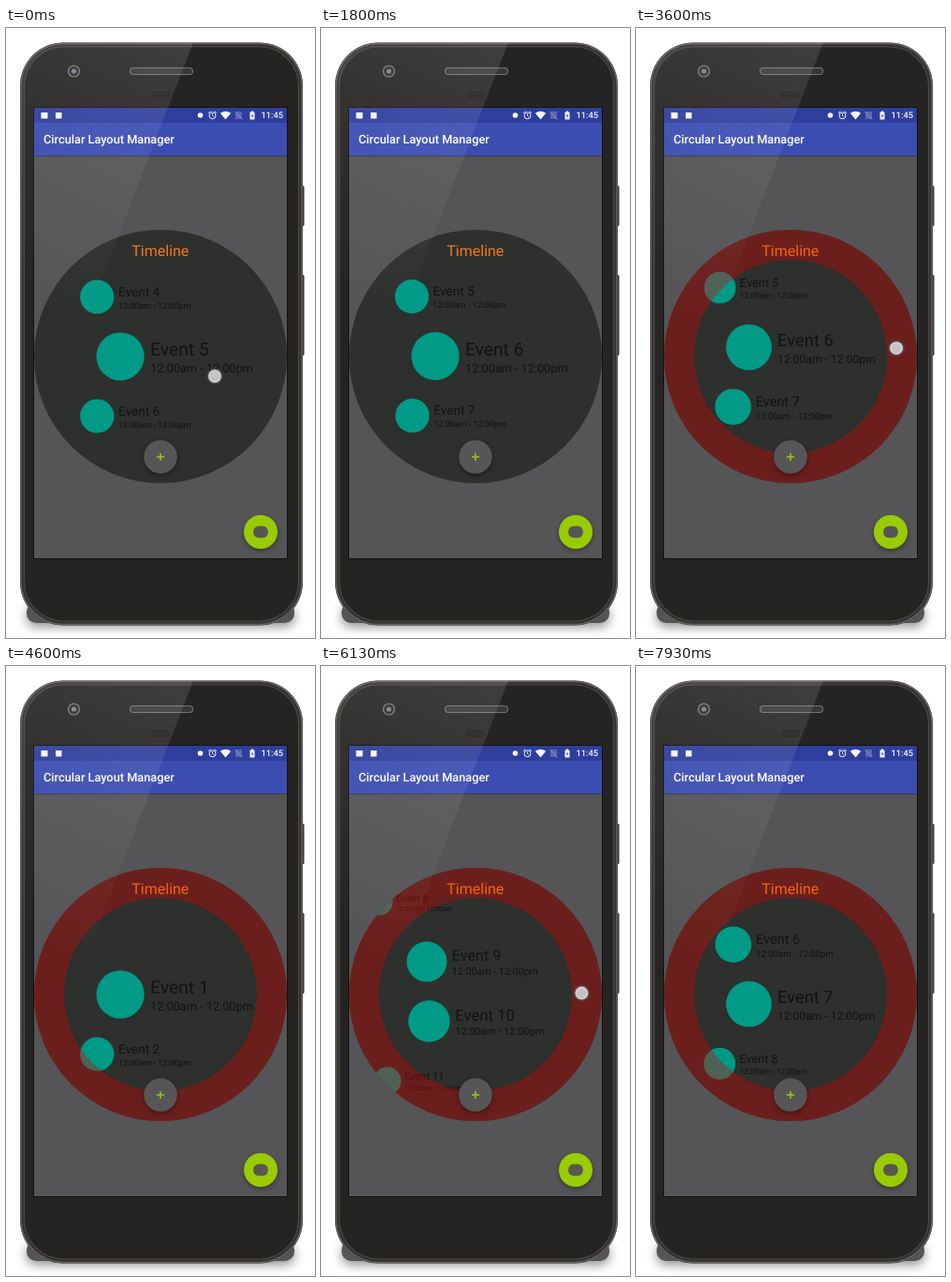
Write an HTML page with a canvas that moves like this. It is 330 px wide and 650 px high and loops after 8000 ms.

```html
<!DOCTYPE html>
<html lang="en">
<head>
<meta charset="utf-8">
<title>Circular Layout Manager</title>
<style>
html, body { margin: 0; width: 100%; height: 100%; overflow: hidden; background: #fff; }
canvas { display: block; width: 100vw; height: 100vh; }
</style>
</head>
<body>
<canvas id="stage"></canvas>
<script>
const W = 330, H = 650, LOOP = 8000;
const CX = 165, CY = 350, DIAL = 135, RING_INNER = 103;
const SPACING = 63.5, ARC = 125, TOUCH_RADIUS = 113.4;
const RING_ON = 2870;
const FONT = 'Roboto, sans-serif';
const TAU = Math.PI * 2;

// [time, centred event, ease-out power]
const scrollKeys = [
  [0, 5], [70, 5], [350, 4], [880, 1, 2.8],
  [1040, 1], [1200, 1.67], [1400, 3], [2480, 7, 3],
  [3380, 7], [3600, 6.16], [3750, 5.4], [4500, 1, 2.8],
  [4750, 1], [5000, 3], [5950, 10, 2.86],
  [6080, 10], [6250, 8.5], [7020, 1, 2.75],
  [7470, 1], [7640, 2.2], [8100, 7, 3.39]
];

// The finger follows the list; without x it moves along the ring
const drags = [
  { from: 0, to: 350, y: 371, x: 223, drift: -8 },
  { from: 1040, to: 1400, y: 462, x: 190, drift: 16 },
  { from: 2500, to: 2800, y: 531, x: 257, drift: 0 },
  { from: 3380, to: 3750, y: 287.5 },
  { from: 4750, to: 5000, y: 420 },
  { from: 6080, to: 6250, y: 320 },
  { from: 7470, to: 7640, y: 400 }
];

const canvas = document.getElementById('stage');
const ctx = canvas.getContext('2d');
const scale = window.devicePixelRatio || 1;
canvas.width = W * scale;
canvas.height = H * scale;
ctx.textRendering = 'geometricPrecision';

function circle(x, y, r, fill) {
  ctx.beginPath();
  ctx.arc(x, y, r, 0, TAU);
  ctx.fillStyle = fill;
  ctx.fill();
}

function box(x, y, w, h, r, fill, stroke, width = 1) {
  ctx.beginPath();
  ctx.roundRect(x, y, w, h, r);
  if (fill) { ctx.fillStyle = fill; ctx.fill(); }
  if (stroke) { ctx.strokeStyle = stroke; ctx.lineWidth = width; ctx.stroke(); }
}

function poly(points, fill) {
  ctx.beginPath();
  points.forEach(([x, y]) => ctx.lineTo(x, y));
  ctx.closePath();
  ctx.fillStyle = fill;
  ctx.fill();
}

function line(points, color, width) {
  ctx.beginPath();
  points.forEach(([x, y], i) => i ? ctx.lineTo(x, y) : ctx.moveTo(x, y));
  ctx.strokeStyle = color;
  ctx.lineWidth = width;
  ctx.stroke();
}

function text(label, x, y, size, color, weight = 400) {
  ctx.font = `${weight} ${size}px ${FONT}`;
  ctx.fillStyle = color;
  ctx.fillText(label, x, y);
}

function withShadow(color, blur, dy, draw) {
  ctx.save();
  ctx.shadowColor = color;
  ctx.shadowBlur = blur * scale;
  ctx.shadowOffsetY = dy * scale;
  draw();
  ctx.restore();
}

function gradient(x0, y0, x1, y1, ...colors) {
  const g = ctx.createLinearGradient(x0, y0, x1, y1);
  colors.forEach((c, i) => g.addColorStop(i / (colors.length - 1), c));
  return g;
}

function scrollAt(t) {
  const i = scrollKeys.findIndex(key => key[0] > t);
  const [t0, s0] = scrollKeys[i - 1];
  const [t1, s1, power = 1] = scrollKeys[i];
  return s1 + (s0 - s1) * ((t1 - t) / (t1 - t0)) ** power;
}

function drawPhone() {
  ctx.fillStyle = '#fff';
  ctx.fillRect(0, 0, W, H);
  withShadow('rgba(0,0,0,.45)', 12, 4, () => box(22, 612, 286, 22, 10, '#555'));
  box(314, 168, 4.5, 43, 1.5, '#3a3836');
  box(314, 263, 4.5, 86, 1.5, '#3a3836');
  box(15, 15.5, 302, 621, 46, '#35322f');
  box(16, 16.5, 300, 619, 45, null, '#65615d', 1.5);
  box(19.5, 20, 293, 612, 42, '#262423', '#4a4744', 1.2);
  box(132.5, 42.5, 67, 7, 3.5, '#393735', '#74716e', 1.1);
  box(153.5, 66.5, 23, 10.5, 5.2, '#1f1e1d', '#2c2a29');
  circle(72.5, 46, 6.6, '#77757a');
  circle(72.5, 46, 5.2, '#2a2a2c');
  circle(72.5, 46, 2.6, '#7d8084');
  box(29, 84, 272, 482, 0, '#111');
}

function drawStatusBar() {
  const white = '#f4f5ff';
  ctx.fillStyle = '#2f3e9c';
  ctx.fillRect(30, 85, 270, 16);
  ctx.fillStyle = '#3c4db1';
  ctx.fillRect(30, 101, 270, 35);
  ctx.fillStyle = 'rgba(0,0,0,.3)';
  ctx.fillRect(30, 136, 270, 1);

  box(37.5, 90, 7, 6.5, 0, white);
  box(53, 90, 6.5, 6.5, 0, white);
  circle(207.5, 93, 2.8, white);

  ctx.beginPath();
  ctx.arc(220.5, 93.3, 3.5, 0, TAU);
  ctx.strokeStyle = white;
  ctx.lineWidth = 1;
  ctx.stroke();
  line([[220.5, 91], [220.5, 93.5], [222, 94.5]], white, .8);
  line([[216.2, 90.6], [218.4, 88.7]], white, 1);
  line([[222.6, 88.7], [224.8, 90.6]], white, 1);

  ctx.beginPath();
  ctx.moveTo(234.5, 97.5);
  ctx.lineTo(228.8, 90.8);
  ctx.quadraticCurveTo(234.5, 86.6, 240.2, 90.8);
  ctx.fillStyle = white;
  ctx.fill();

  poly([[246, 89], [252, 89], [252, 97], [245, 97], [245, 90.5]], '#5b66ae');
  line([[244.5, 89], [252.5, 97.5]], '#8f98cc', .9);
  box(260.5, 89.5, 5, 8, .6, white);
  box(262, 88.5, 2, 1.5, 0, white);
  poly([[263.5, 91], [261.8, 94], [262.9, 94], [262.5, 96.2], [264.3, 93.2], [263.2, 93.2]], '#2f3e9c');
  text('11:45', 272.4, 96.4, 9.3, white, 500);
  text('Circular Layout Manager', 40, 123, 12.75, '#fff', 500);
}

function drawEvent(index, dy) {
  const r = 25.6 - .118 * Math.abs(dy);
  const left = 96.5 - ARC + Math.sqrt(ARC * ARC - dy * dy);
  const y = CY + dy;
  const textX = left + r * 2.25;
  circle(left + r, y, r, '#009a87');
  text('Event ' + index, textX, y - .04 * r, r * .752, '#111311');
  text('12:00am - 12:00pm', textX, y + .67 * r, r * .498, '#111311');
}

function drawDial(scroll, ringOn) {
  circle(CX, CY, DIAL, '#2d302d');
  ctx.save();
  ctx.beginPath();
  ctx.arc(CX, CY, DIAL, 0, TAU);
  ctx.clip();
  for (let i = Math.max(1, Math.floor(scroll) - 1); i <= scroll + 2; i++) {
    const dy = (i - scroll) * SPACING;
    if (Math.abs(dy) < 105) drawEvent(i, dy);
  }
  ctx.restore();
  if (ringOn) {
    ctx.beginPath();
    ctx.arc(CX, CY, (DIAL + RING_INNER) / 2, 0, TAU);
    ctx.strokeStyle = 'rgba(208,5,0,.38)';
    ctx.lineWidth = DIAL - RING_INNER;
    ctx.stroke();
  }
  text('Timeline', 134.3, 243, 16, ringOn ? '#f8640d' : '#f47a1c');
}

function drawButtons() {
  withShadow('rgba(0,0,0,.38)', 5, 2, () => {
    circle(CX, 457, 17.8, '#565658');
    circle(272, 537, 18, '#98cb04');
  });
  line([[161, 457], [169, 457]], '#98cb04', 1.5);
  line([[165, 453], [165, 461]], '#98cb04', 1.5);
  box(264.2, 530.8, 15.6, 12.4, 5.5, '#565753');
}

function drawSheen() {
  ctx.save();
  ctx.beginPath();
  ctx.roundRect(16, 16, 300, 619, 45);
  ctx.clip();
  poly([[0, 0], [206, 0], [70, 350], [0, 350]],
    gradient(200, 15, 60, 310, 'rgba(255,255,255,.12)', 'rgba(255,255,255,.05)', 'rgba(255,255,255,0)'));
  ctx.restore();
}

function drawFinger(t) {
  const drag = drags.find(d => t >= d.from && t < d.to);
  if (!drag) return;
  const y = drag.y - (scrollAt(t) - scrollAt(drag.from)) * SPACING;
  const x = drag.x === undefined
    ? CX + Math.sqrt(TOUCH_RADIUS ** 2 - (y - CY) ** 2)
    : drag.x + drag.drift * (t - drag.from) / (drag.to - drag.from);
  circle(x, y, 8.8, 'rgba(95,92,112,.45)');
  circle(x, y, 7, '#d2d0d3');
  circle(x, y, 5.2, '#c4c3c2');
}

function render(t) {
  ctx.setTransform(scale, 0, 0, scale, 0, 0);
  drawPhone();
  ctx.fillStyle = '#555557';
  ctx.fillRect(30, 85, 270, 480);
  drawStatusBar();
  drawDial(scrollAt(t), t >= RING_ON);
  drawButtons();
  drawSheen();
  drawFinger(t);
}

const start = performance.now();
function tick() {
  render((performance.now() - start) % LOOP);
  requestAnimationFrame(tick);
}
tick();
</script>
</body>
</html>
```
